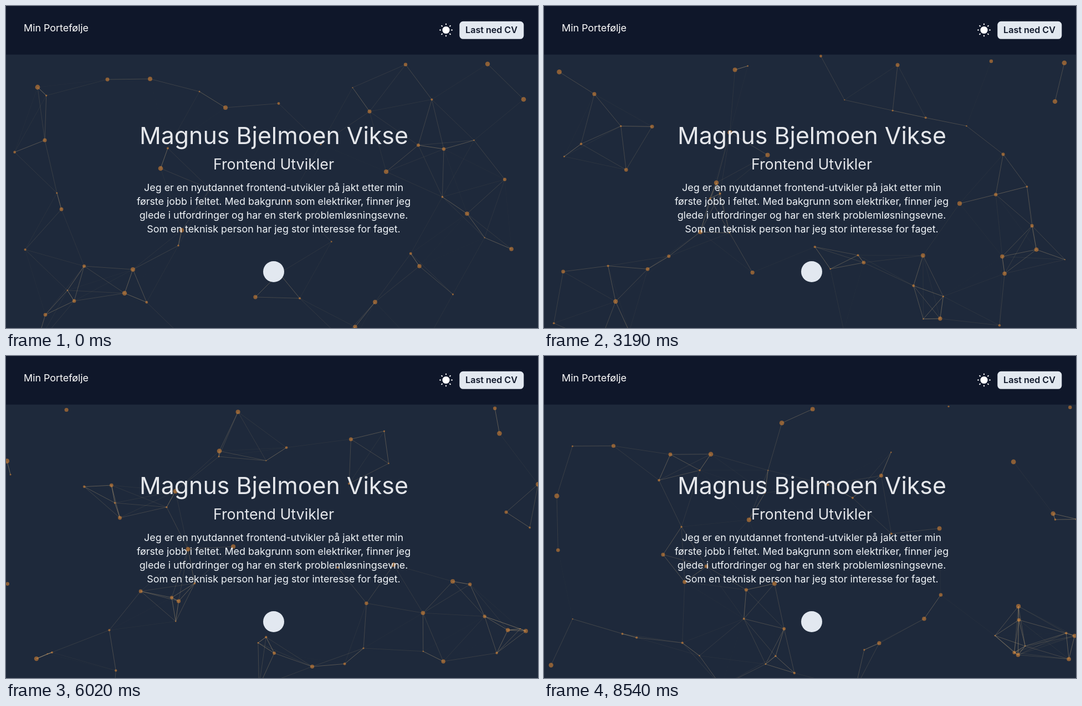
Animation of 960 by 583 pixels, one loop 8.64 s. Source, as an HTML page with a canvas:

```html
<!DOCTYPE html>
<html lang="no">
<head>
<meta charset="utf-8">
<title>Min Portefølje</title>
<style>
  html, body { margin: 0; width: 100%; height: 100%; overflow: hidden; background: #1e293b; }
  canvas, svg { position: absolute; left: 0; top: 0; width: 960px; height: 583px; }
  text { font-family: Inter, "Open Sans", sans-serif; fill: #e5e7eb; }
  .body { font-size: 17.86px; }
  .body text { fill: #f1f5f9; }
  .mid { text-anchor: middle; }
</style>
</head>
<body>
<canvas id="net" width="960" height="583"></canvas>
<svg viewBox="0 0 960 583">
  <rect width="960" height="88" fill="#0f172a"/>
  <text class="body" x="32" y="46" style="fill:#fff">Min Portefølje</text>
  <g id="sun" stroke="#fff" stroke-width="2" stroke-linecap="round">
    <circle cx="794" cy="43.5" r="6.6" fill="#fff" stroke="none"/>
  </g>
  <rect x="818.3" y="27.8" width="116" height="32" rx="6.5" fill="#e2e8f0"/>
  <text class="mid" x="876" y="49" style="font-size:16.07px;font-weight:600;fill:#0f172a">Last ned CV</text>
  <text class="mid" x="483.5" y="250" style="font-size:42.86px">Magnus Bjelmoen Vikse</text>
  <text class="mid" x="483" y="296" style="font-size:26.8px">Frontend Utvikler</text>
  <g class="body mid">
    <text x="483" y="335">Jeg er en nyutdannet frontend-utvikler på jakt etter min</text>
    <text x="483" y="360">første jobb i feltet. Med bakgrunn som elektriker, finner jeg</text>
    <text x="483" y="385">glede i utfordringer og har en sterk problemløsningsevne.</text>
    <text x="483" y="410">Som en teknisk person har jeg stor interesse for faget.</text>
  </g>
  <circle cx="483" cy="481" r="19" fill="#e2e8f0"/>
</svg>
<script>
const LOOP = 8640, STEPS = 85, STEP = 8540 / STEPS;
const SPEED = 26.8, REACH = 134, SMALL = 30;
const BOX = { left: -3.5, right: 968.5, top: 88.3, bottom: 720 };

// Key dots from largest to smallest: start x, y and heading in degrees.
const KEYS = [
  [57, 147, -110], [934, 169, -50], [279, 294, -49], [317, 406, -94], [869, 105, 52],
  [214, 520, 170], [686, 300, 42], [229, 477, -52], [396, 184, 85], [260, 132, -11],
  [666, 536, -78], [832, 376, 49], [912, 440, 171], [746, 471, 9], [630, 581, -10],
  [450, 527, -149], [427, 664, -39], [70, 243, -76], [656, 191, -102], [183, 133, 82],
  [100, 368, -56], [123, 534, -42], [71, 559, -115], [493, 484, -13], [721, 106, -4],
  [790, 259, 73], [900, 314, 103], [141, 471, -12], [744, 252, 11], [606, 644, -139]
];

const mix = (a, b, f) => a + (b - a) * f;

function makeDot(x, y, deg, r) {
  const a = deg * Math.PI / 180;
  return { x, y, r, vx: SPEED * Math.cos(a), vy: SPEED * Math.sin(a) };
}

const dots = KEYS.map(([x, y, deg], i) => makeDot(x, y, deg, mix(4.4, 2.9, i / KEYS.length)));

// Small dots fill the box evenly, with headings a golden angle apart.
for (let i = 1; i <= SMALL; i++) {
  const x = mix(BOX.left, BOX.right, i * 0.7549 % 1);
  const y = mix(BOX.top, BOX.bottom, i * 0.5698 % 1);
  dots.push(makeDot(x, y, i * 137.5, mix(2.5, 1, i / SMALL)));
}

// Mirrors a straight path back and forth between two walls.
function fold(v, lo, hi) {
  const span = hi - lo, turn = 2 * span;
  const m = ((v - lo) % turn + turn) % turn;
  return lo + (m > span ? turn - m : m);
}

function place({ x, y, vx, vy, r }, s) {
  return {
    r,
    x: fold(x + vx * s, BOX.left + r, BOX.right - r),
    y: fold(y + vy * s, BOX.top + r, BOX.bottom - r)
  };
}

const ctx = document.getElementById("net").getContext("2d");

function link(p, q) {
  const d = Math.hypot(p.x - q.x, p.y - q.y);
  if (d >= REACH) return;
  ctx.strokeStyle = `rgba(255,215,150,${0.5 * (1 - d / REACH)})`;
  ctx.beginPath();
  ctx.moveTo(p.x, p.y);
  ctx.lineTo(q.x, q.y);
  ctx.stroke();
}

function draw(s) {
  const pts = dots.map(d => place(d, s));
  ctx.clearRect(0, 0, 960, 583);
  ctx.lineWidth = 0.9;
  pts.forEach((p, i) => pts.slice(i + 1).forEach(q => link(p, q)));
  ctx.fillStyle = "rgba(248,148,50,.5)";
  for (const p of pts) {
    ctx.beginPath();
    ctx.arc(p.x, p.y, p.r, 0, 2 * Math.PI);
    ctx.fill();
  }
}

for (let i = 0; i < 8; i++) {
  const ray = document.createElementNS("http://www.w3.org/2000/svg", "path");
  ray.setAttribute("d", "M804 43.5h1");
  ray.setAttribute("transform", `rotate(${i * 45} 794 43.5)`);
  document.getElementById("sun").append(ray);
}

// The picture advances in hard steps, about ten a second.
let shown = -1;
function tick() {
  const t = performance.now() % LOOP;
  const step = Math.min(STEPS, Math.floor(t / STEP + 0.3));
  if (step !== shown) {
    shown = step;
    draw(step * STEP / 1000);
  }
  requestAnimationFrame(tick);
}
tick();
</script>
</body>
</html>
```
